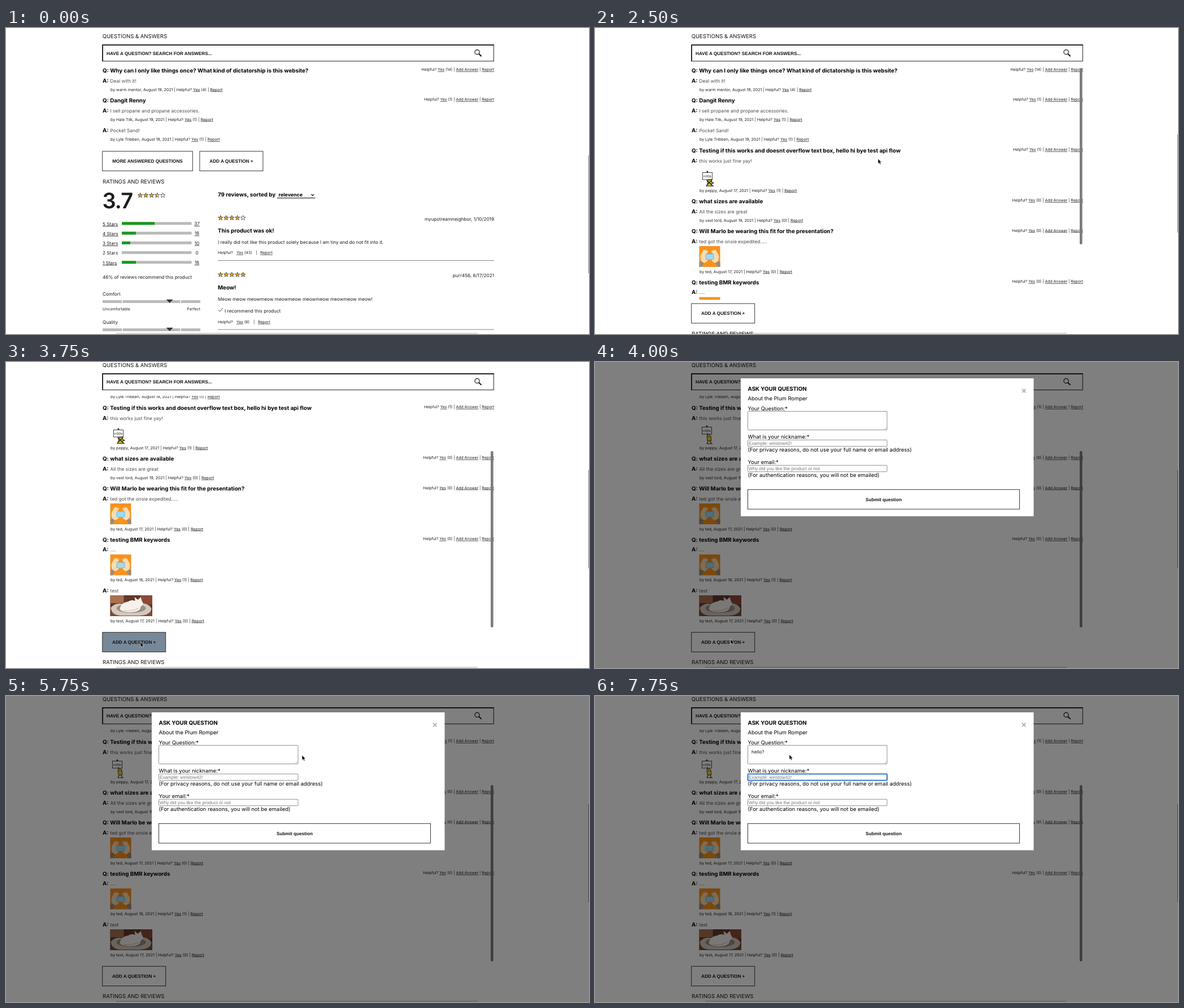
An HTML page for the animation above (8000 ms loop, 1032 px wide and 543 px high).

```html
<!DOCTYPE html>
<html lang="en">
<head>
<meta charset="utf-8">
<title>Questions and answers</title>
<style>
html, body { margin: 0; width: 100%; height: 100%; overflow: hidden; background: #fff; }
svg { display: block; width: 1032px; height: 543px; }
text { font: 8.2px Inter, sans-serif; fill: #1c1c1c; white-space: pre; text-rendering: geometricPrecision; }
.u { text-decoration: underline; }
.head { font-size: 9.55px; fill: #111; }
.bold { font-size: 9.78px; font-weight: 700; fill: #000; }
.ans { font-size: 8.4px; fill: #4c4c4c; }
.small { font-size: 6.9px; }
.by { font-size: 7.05px; }
.form { font-size: 9.45px; fill: #000; }
.btn { font: bold 8.19px "Liberation Sans", Arial, sans-serif; fill: #111; }
.hint { font: 8.19px "Liberation Sans", Arial, sans-serif; fill: #757575; }
.score { font-size: 38px; font-weight: 600; letter-spacing: -1px; }
.pick { font-size: 8.85px; font-weight: 700; fill: #000; }
.sign { font-size: 5.6px; }
.says { font-size: 9.1px; }
.note { font-size: 7.9px; }
.ok { font-size: 7.6px; fill: #fff; }
.end { text-anchor: end; }
.mid { text-anchor: middle; }
</style>
</head>
<body>
<svg id="stage" viewBox="0 0 1032 543"></svg>
<script>
const text = (x, y, s, cls = '') => `<text x="${x}" y="${y}" class="${cls}">${s}</text>`;
const rect = (x, y, w, h, fill, more = '') =>
  `<rect x="${x}" y="${y}" width="${w}" height="${h}" fill="${fill}" ${more}/>`;
const path = (d, fill, more = '') => `<path d="${d}" fill="${fill}" ${more}/>`;
const line = (d, color, width) => path(d, 'none', `stroke="${color}" stroke-width="${width}"`);
const link = s => `<tspan class="u">${s}</tspan>`;
const group = (id, body, more = '') => `<g id="${id}" ${more}>${body}</g>`;

const button = (id, x, y, w, h, label) => group(id,
  rect(x, y, w, h, '#fff', 'stroke="#222" stroke-width=".9"') +
  text(x + w / 2, y + h / 2 + 2.9, label, 'btn mid'));

function star(x, y, fill) {
  let d = '';
  for (let i = 0; i < 10; i++) {
    const r = i % 2 ? 1.9 : 4.5, a = i * Math.PI / 5 - Math.PI / 2;
    d += (i ? 'L' : 'M') + (x + r * Math.cos(a)).toFixed(2) + ' ' + (y + r * Math.sin(a)).toFixed(2);
  }
  return path(d + 'Z', fill, 'stroke="#333" stroke-width=".75" stroke-linejoin="round"');
}

function stars(x, y, score) {
  let out = '';
  for (let i = 0; i < 5; i++) {
    const left = score - i;
    out += star(x + i * 10, y, left >= 1 ? '#eba41c' : left > 0 ? 'url(#half)' : '#fff');
  }
  return out;
}

// Question list; y values are text centres
const question = (y, s, votes) => text(171, y + 3.5, 'Q: ' + s, 'bold') +
  text(864, y + 1, `Helpful? ${link('Yes')} (${votes}) | ${link('Add Answer')} | ${link('Report')}`, 'small end');

const answer = (y, s, byY, by, votes) =>
  text(171, y + 3.4, 'A:', 'bold') + text(184.5, y + 3.1, s, 'ans') +
  text(185, byY + 2.5, `by ${by}, 2021 | Helpful? ${link('Yes')} (${votes}) | ${link('Report')}`, 'by');

function maskCard(y) {
  const hand = path('M0 29L4 26 8 31 4 37H0Z', '#9a8d7c') +
    path('M4 27Q1 21 3 15L7 8 9 6 10 8 13 6 13 9 16 8 15 11 11 15V23L15 25 14 27 9 30Z', '#fbdcae');
  return `<g transform="translate(184.5 ${y})">` + rect(0, 0, 37, 37, '#f6921e') + hand +
    `<g transform="matrix(-1 0 0 1 37 0)">${hand}</g>` +
    rect(10.5, 14, 16, 10.5, '#8fcfec', 'rx="1.5"') + line('M13 17.5H24M13 21H24', '#d9f0fa', 1.2) + '</g>';
}

const petPhoto = y => `<g transform="translate(184.5 ${y})">` +
  rect(0, 0, 74.5, 37, '#63382a') + rect(0, 0, 24, 14, '#a9714e') + rect(54, 0, 20.5, 16, '#8c4a36') +
  rect(0, 29, 74.5, 8, '#7d4c36') +
  path('M1 22Q8 13 20 15L56 14Q70 15 73 24Q72 35 52 36H18Q2 35 1 22Z', '#d3c7be') +
  '<ellipse cx="37" cy="23" rx="26" ry="8" fill="#9d8c82"/>' +
  path('M17 25Q18 13 32 11Q38 7 44 10L43 3 49 8 54 3 56 10Q61 16 54 20Q54 29 38 30Q22 31 17 25Z', '#f6f1eb') +
  line('M24 27Q38 29 50 23', '#cdbfb3', 1.2) + '</g>';

const figure = group('signBoard',
    '<circle cx="199" cy="255" r="1.5" fill="#222"/>' +
    rect(190.5, 256.5, 17, 12.5, '#fff', 'stroke="#333" stroke-width=".9"') +
    text(199, 264.8, 'n00b', 'sign mid')) +
  group('bent', path('M198 270L207 269 206 273 210 275 205 277 209 280.5H197L200 275Z', '#cdb62b',
    'stroke="#222" stroke-width="1.1"') + line('M199 271L207 279M198 278.5L206 271', '#222', 1.2)) +
  group('upright', line('M199 262V272M201 275L198 281M203 275L206 281M198 281H208', '#222', 1.1) +
    path('M198 267Q202 263 205 267L206 276H199Z', '#f2d230', 'stroke="#222" stroke-width=".8"') +
    line('M200.5 268V270M203.5 268V270', '#222', .8));

const list =
  question(75, 'Why can I only like things once? What kind of dictatorship is this website?', 14) +
  answer(93.5, 'Deal with it!', 109, 'warm mentor, August 19', 4) +
  question(128, 'Dangit Renny', 1) +
  answer(146.5, 'I sell propane and propane accessories.', 162, 'Hale Tilk, August 19', 1) +
  answer(182, 'Pocket Sand!', 197.5, 'Lyle Tribben, August 19', 1) +
  question(217, 'Testing if this works and doesnt overflow text box, hello hi bye test api flow', 1) +
  answer(235.5, 'this works just fine yay!', 288, 'peppy, August 17', 1) + figure +
  question(307, 'what sizes are available', 0) +
  answer(325.5, 'All the sizes are great', 341.2, 'vest lord, August 19', 0) +
  question(360.5, 'Will Marlo be wearing this fit for the presentation?', 0) +
  answer(379, 'ted got the onsie expedited.....', 432, 'ted, August 17', 0) + maskCard(387) +
  question(451, 'testing BMR keywords', 0) +
  answer(469, '....', 522, 'ted, August 16', 1) + maskCard(477.5) +
  answer(542, 'test', 595, 'test, August 17', 0) + petPhoto(550);

// Ratings and reviews
const rows = [[5, 37, 58], [4, 16, 25], [3, 10, 15], [2, 0, 0], [1, 16, 25]].map(([n, count, w], i) => {
  const y = 347.3 + i * 17.25, mark = count ? link : s => s;
  return text(171, y + 3.2, mark(n + ' Stars')) + text(338, y + 2.8, mark(count), 'mid') +
    rect(205, y - 3, 123.5, 5, '#bababa') + rect(205, y - 3, w, 5, '#17991b');
}).join('');

const slider = (y, name, low, high) => text(171, y + 3, name) +
  rect(171, y + 11, 34, 5, '#bababa') + rect(206.5, y + 11, 101.8, 5, '#bababa') +
  rect(309.8, y + 11, 34.2, 5, '#bababa') +
  path(`M283.6 ${y + 9.8}H295.8L289.7 ${y + 15.8}Z`, '#333') +
  text(171, y + 28.8, low, 'small') + text(344, y + 28.8, high, 'small end');

const review = (y, score, who, title, body, footY, votes, barX, reportX) =>
  stars(379.7, y, score) + text(864, y + 4.6, who, 'end') +
  text(375, y + 26.3, title, 'bold') + text(375, y + 46, body) +
  text(375, footY, 'Helpful?', 'small') + text(408, footY, `${link('Yes')} (${votes})`, 'small') +
  text(barX, footY, '|', 'small') + text(reportX, footY, link('Report'), 'small') +
  line(`M375 ${footY + 11.2}H864`, '#777', .9);

const reviews = text(171, 275.5, 'RATINGS AND REVIEWS', 'head') +
  text(170.5, 319.5, '3.7', 'score') + stars(237.6, 297, 3.5) + rows +
  text(171, 445, '46% of reviews recommend this product') +
  slider(472, 'Comfort', 'Uncomfortable', 'Perfect') + slider(522, 'Quality', 'Poor', 'Perfect') +
  text(375, 299, '79 reviews, sorted by', 'bold') + text(482.5, 299, 'relevence', 'pick') +
  line('M480 301.7H547.5', '#000', 1) + line('M540.3 294.8L542.8 297.3 545.3 294.8', '#000', 1.2) +
  review(337, 4, 'myupstreamneighbor, 1/10/2019', 'This product was ok!',
    'I really did not like this product solely because I am tiny and do not fit into it.', 401.3, 43, 442.5, 450) +
  review(437.8, 5, 'purr456, 8/17/2021', 'Meow!',
    'Meow meow meowmeow meowmeow meowmeow meowmeow meow!', 523.8, 6, 438, 446) +
  line('M376 500.5L378.5 503 383.8 497', '#222', .9) + text(387, 505.3, 'I recommend this product');

const search = rect(170.9, 30.1, 692.4, 28.7, '#fff', 'stroke="#333" stroke-width="1.1"') +
  line('M171 59V30.3H863.5', '#000', 1.4) +
  text(178, 47.5, 'HAVE A QUESTION? SEARCH FOR ANSWERS...', 'btn') +
  '<circle cx="834" cy="42.8" r="4.1" fill="none" stroke="#111" stroke-width="1.2"/>' +
  line('M837 45.8L841.6 50.2', '#111', 2);

// Dialogs
const field = (id, y, h) => rect(270.5, y, 246.5, h, '#fff', `id="${id}" rx="1"`);
const modal = rect(258, 29, 518.5, 244.7, '#fff') +
  text(270.5, 50.6, 'ASK YOUR QUESTION', 'bold') +
  text(270.5, 68, 'About the Plum Romper', 'form') +
  text(270.5, 85.5, 'Your Question:*', 'form') + field('area', 87.5, 33) +
  line('M512 119.5L516 115.5M514.3 119.7L516.2 117.8', '#888', .6) +
  text(277, 102.3, '', 'typed') +
  text(270.5, 136, 'What is your nickname:*', 'form') + field('nick', 138.3, 11.4) +
  text(272, 146.9, 'Example: winslow42!', 'hint') +
  text(270.5, 159, '(For privacy reasons, do not use your full name or email address)', 'form') +
  text(270.5, 181.4, 'Your email:*', 'form') + field('mail', 183.3, 11.4) +
  text(272, 191.9, 'Why did you like the product or not', 'hint') +
  text(270.5, 204.4, '(For authentication reasons, you will not be emailed)', 'form') +
  button('submit', 270.5, 226.3, 481, 34.8, 'Submit question') +
  line('M756 48L762.4 54.4M762.4 48L756 54.4', '#b0b0b0', 1.8);

const notice = rect(379, -8, 277, 133, '#fff', 'rx="4" filter="url(#soft)"') +
  text(388.7, 15, 'draftport:4060 says', 'says') +
  ['You must enter or address the following:', '- Question', '- Name', '- Email']
    .map((s, i) => text(388.7, 33 + i * 12.4, s, 'note')).join('') +
  rect(606, 95.3, 39.8, 19.8, '#3f7ecf', 'rx="2.5"') + text(626, 108, 'OK', 'ok mid');

const arrow = 'M0 0V8.8L2 7 3.5 10.2 5 9.5 3.6 6.4H6.2Z';

stage.innerHTML = `<defs>
  <clipPath id="view"><rect id="window" x="165" y="69.3" width="705" height="413"/></clipPath>
  <linearGradient id="half"><stop offset=".5" stop-color="#eba41c"/><stop offset=".5" stop-color="#fff"/></linearGradient>
  <linearGradient id="fade" x2="0" y2="1"><stop stop-opacity="0"/><stop offset="1" stop-opacity=".2"/></linearGradient>
  <filter id="soft" x="-10%" y="-10%" width="120%" height="130%">
    <feDropShadow dx="0" dy="2" stdDeviation="4" flood-opacity=".4"/></filter>
  </defs>` + rect(0, 0, 1032, 543, '#fff') +
  group('page',
    text(170.7, 18, 'QUESTIONS &amp; ANSWERS', 'head') + search +
    `<g clip-path="url(#view)">${group('list', list)}</g>` +
    rect(858, 71, 4.6, 313, '#7c7c7c', 'id="thumb" rx="2.3"') +
    button('more', 170.7, 218.8, 159.6, 34.8, 'MORE ANSWERED QUESTIONS') +
    button('add', 342.9, 218.8, 112, 34.8, 'ADD A QUESTION +') +
    group('reviews', reviews)) +
  rect(195, 539.5, 640, 3.5, 'url(#fade)') +
  rect(1031, 226, 1, 209, '#7c7c7c', 'id="bar"') +
  group('dialog', rect(0, 0, 1032, 543, '#000', 'opacity=".5"') + modal) +
  group('notice', notice) +
  group('cursor', path(arrow, '#000', 'stroke="#fff" stroke-width=".6"'));

const $ = id => document.getElementById(id);
const typed = document.querySelector('.typed');
const set = (id, name, value) => $(id).setAttribute(name, value);
const move = (id, x, y) => set(id, 'transform', `translate(${x} ${y})`);
const show = (id, on) => set(id, 'visibility', on ? 'visible' : 'hidden');
const hover = (id, on) => $(id).firstChild.setAttribute('fill', on ? '#778899' : '#fff');
const focus = (id, on) => {
  set(id, 'stroke', on ? '#1a6ac4' : '#767676');
  set(id, 'stroke-width', on ? 1.8 : .8);
};

// Tracks of [step, values...]; one step lasts 250 ms
const STEP = 250, LOOP = 8000;
const pointer = [[2, 405, 133], [3, 296, 185], [4, 335, 236], [5, 335, 236], [6, 300, 237], [7, 300, 237],
  [8, 372, 240], [9, 460, 238], [10, 501, 232], [12, 501, 232], [15, 238, 497], [16, 240, 492],
  [19, 530, 246], [20, 575, 180], [21, 614, 105.5], [22, 614, 105.5], [25, 344, 104]];
const listScroll = [[10, 0], [13, 126.7]];
const pageScroll = [[12, 0], [14, 9.3]];
const bob = [[0, 0, 0], [-1, -5, 1], [0, -2, 1], [-2, -5, 1], [-2, 0, 0]];

function at(track, s) {
  const i = track.findIndex(k => k[0] >= s);
  if (i < 0) return track[track.length - 1].slice(1);
  if (i === 0) return track[0].slice(1);
  const a = track[i - 1], b = track[i], f = (s - a[0]) / (b[0] - a[0]);
  return a.slice(1).map((v, j) => v + (b[j + 1] - v) * f);
}

function draw(s) {
  const open = s >= 7;
  const [scroll] = at(listScroll, s), [top] = at(pageScroll, s);
  move('page', 0, -top);
  move('list', 0, -scroll);
  set('window', 'height', open ? 413 : 141);
  show('thumb', open);
  move('thumb', 0, scroll * .76);
  show('more', !open);
  hover('more', s === 6);
  move('add', open ? -172.2 : 0, open ? 270.2 : 0);
  hover('add', s === 15);
  move('reviews', 0, open ? 270.2 : 0);
  set('bar', 'y', open ? 189 + top / 3 : 226);
  set('bar', 'height', open ? 174 : 209);

  const [dx, dy, up] = bob[s % 5];
  move('signBoard', dx, dy);
  show('bent', !up);
  show('upright', up);

  show('dialog', s >= 16);
  show('notice', s >= 20 && s <= 22);
  hover('submit', s >= 19 && s <= 22);
  focus('area', s >= 26 && s <= 30);
  focus('nick', s === 31);
  focus('mail', false);
  typed.textContent = 'hello?'.slice(0, [0, 2, 4, 5][Math.max(0, s - 26)] ?? 6);

  show('cursor', s >= 2);
  move('cursor', ...at(pointer, s));
}

function tick() {
  draw(Math.floor(performance.now() % LOOP / STEP));
  requestAnimationFrame(tick);
}
tick();
</script>
</body>
</html>
```
